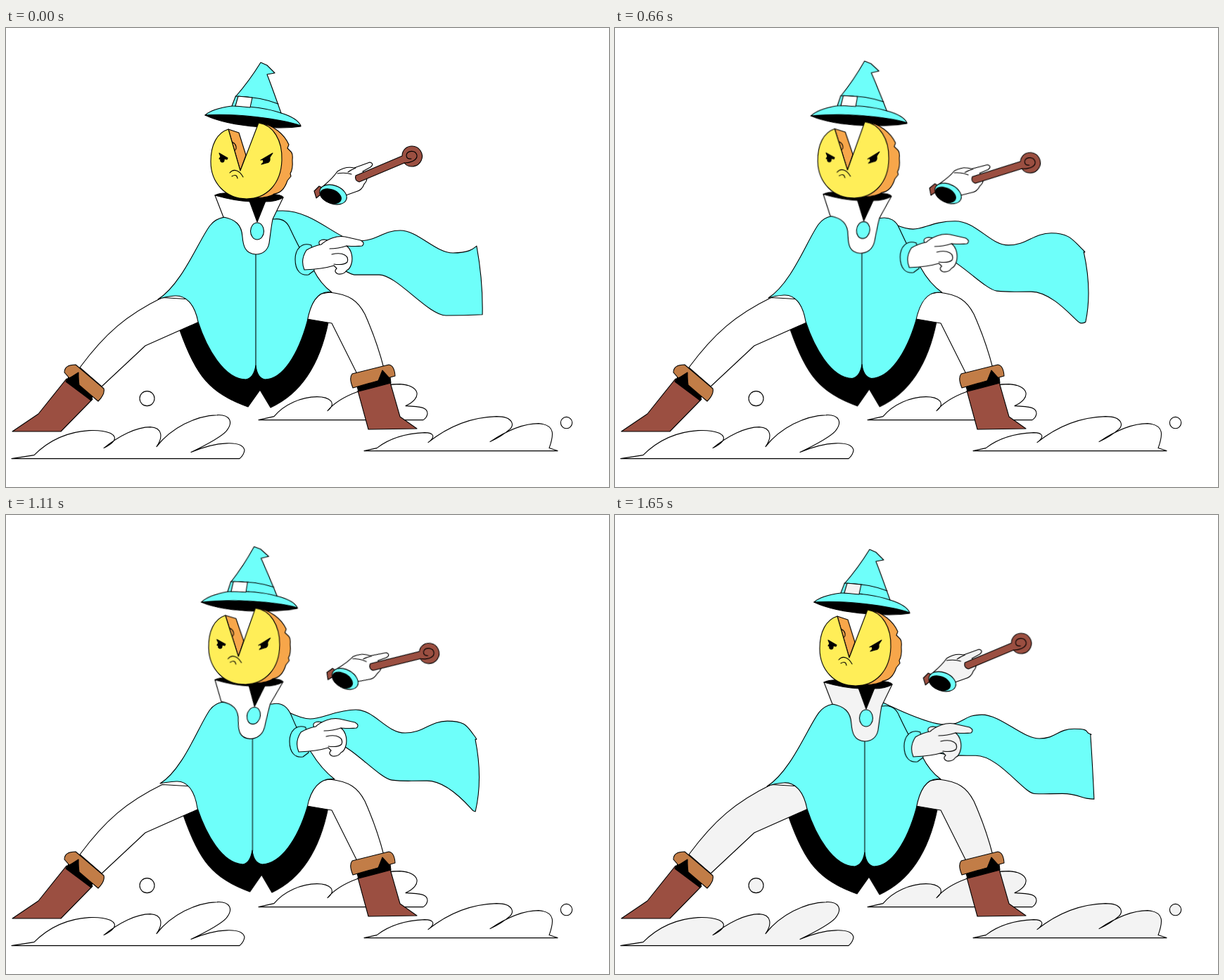
An HTML page without scripts that plays this animation: 857x653 px, repeating every 1680 ms.

```html
<!DOCTYPE html>
<html lang="en">
<head>
<meta charset="utf-8">
<title>Cheese wizard</title>
<style>
html, body { margin: 0; width: 100%; height: 100%; overflow: hidden; background: #fff; }
svg { display: block; width: 100vw; height: 100vh; }
path, ellipse, circle { stroke: #000; stroke-width: 1.1; stroke-linejoin: round; stroke-linecap: round; }
.line { fill: none; }
.ink { fill: #000; }
.cyan { fill: #6efffa; }
.yellow { fill: #ffee58; }
.orange { fill: #f7a64a; }
.brown { fill: #9b4f41; }
.tan { fill: #c27d47; }
.white { fill: #fff; animation: shade 840ms infinite step-end; }

@keyframes shade {
  0% { fill: #fff; }
  89.2% { fill: #f3f3f3; }
}

/* Each swaying part sets its two poses, --a and --b. */
.sway { animation: sway 840ms infinite; }
@keyframes sway {
  0% { transform: none; animation-timing-function: cubic-bezier(.4, 0, .7, .75); }
  32.14% { transform: var(--a); animation-timing-function: cubic-bezier(.3, .4, .6, 1); }
  57.14% { transform: var(--b); animation-timing-function: cubic-bezier(.4, 0, .6, 1); }
  100% { transform: none; }
}
.hat { transform-origin: 351px 132px; --a: translate(-5px, -3.5px) rotate(-3deg); --b: translate(-8.5px, -3.2px) rotate(-4.4deg); }
.head { transform-origin: 342px 190px; --a: translate(-3px, -2px) rotate(-1.6deg); --b: translate(-5.7px, -2.3px) rotate(-2.4deg); }
.collar { transform-origin: 345px 238px; --a: translate(0, -3.5px) skewX(-5.6deg); --b: translate(-2px, -3px) skewX(-7.5deg); }
.seam { --a: translate(-4.6px, -3px); --b: translate(-8.4px, -3px); }
.pants { transform-origin: 353px 480px; --a: translate(2.5px, -3px) scaleX(.976); --b: translate(1px, -2.5px) scaleX(.971); }
.point { --a: translate(-8px, -7px); --b: translate(-11.5px, -6.5px); }
.wand { transform-origin: 464px 237px; --a: translate(17px, -4px) rotate(9deg); --b: translate(17px, -3.5px) rotate(11deg); }

.poncho { animation: poncho 840ms infinite; }
@keyframes poncho {
  0%, 100% {
    d: path("M216,386 C250,365 275,300 290,281 C300,268 318,266 328,272 L380,272 C392,270 400,276 404,286 C412,303 425,330 437,344 Q447,364 463,376 C444,373 433,390 428,418 C415,465 393,500 368,500 Q357,498 355,480 Q352,498 341,500 C310,500 285,455 273,418 C268,392 255,380 240,381 Q226,382 216,386Z");
    animation-timing-function: cubic-bezier(.4, 0, .7, .75);
  }
  32.14% {
    d: path("M219,382 C252,362 275,297 290,277 C300,264 315,264 325,269 L378,269 C391,266 400,273 405,284 C411,298 421,323 434,338 Q448,361 467,376 C446,373 433,390 428,416 C414,463 390,496 364,497 Q352,495 350,477 Q347,495 337,497 C307,496 284,453 272,417 C268,390 256,378 242,379 Q228,380 219,382Z");
    animation-timing-function: cubic-bezier(.3, .4, .6, 1);
  }
  57.14% {
    d: path("M220,382 C252,362 274,297 289,277 C299,264 313,264 322,269 L374,269 C389,266 400,273 404,284 C411,298 420,323 432,338 Q446,362 467,377 C446,373 433,390 427,416 C412,463 387,496 361,497 Q349,495 347,477 Q344,495 333,497 C304,496 281,453 269,417 C265,390 254,378 240,379 Q228,380 220,382Z");
    animation-timing-function: cubic-bezier(.4, 0, .6, 1);
  }
}

/* Waves run outward along the cape, one wavelength per cycle. */
.cape { animation: wave 420ms linear infinite; }
@keyframes wave {
  0% { d: path("M370,275 S360,262 372,262 S348,260 393,260 S472,303 500,303 S535,288 560,288 S610,320 635,320 S665,313 669,310 Q678,360 677,408 S650,409 625,409 S555,351 530,351 S505,351 495,351 S450,322 430,322 S424,320 420,320 L410,330Z"); }
  14.286% { d: path("M370,275 S360,263 372,262 S342,261 397,261 S488,302 510,302 S548,284 577,284 S628,316 650,316 S658,316 662,314 Q680,365 680,395 S668,411 643,411 S580,357 550,357 S520,356 508,356 S455,322 432,322 S424,320 420,320 L410,330Z"); }
  64.286% { d: path("M385,272 S415,290 432,290 S470,277 497,277 S540,310 567,310 S602,293 627,293 S655,300 664,312 S666,317 667,320 Q678,375 667,422 S666,422 664,421 S630,378 598,378 S565,379 548,377 S490,328 470,325 S450,322 440,322 L410,330Z"); }
  92.857% { d: path("M372,263 S440,298 467,298 S493,284 520,284 S578,318 602,318 S628,304 652,304 S668,309 674,311 S676,312 676,312 Q679,360 681,404 S677,404 670,403 S655,396 635,396 S610,397 595,396 S545,342 512,342 S493,341 485,343 L410,330Z"); }
  100% { d: path("M390,258 S450,285 500,303 S535,288 560,288 S610,320 635,320 S660,312 667,311 S668,310 669,310 S669,310 669,310 Q678,360 677,408 S677,408 676,408 S665,407 660,407 S650,409 625,409 S555,351 530,351 S505,351 495,351 L410,330Z"); }
}
</style>
</head>
<body>
<svg viewBox="0 0 857 653" preserveAspectRatio="none">
  <g class="dust" transform="translate(0 .6)">
    <path class="white" d="M8,612 L40,607 C60,587 85,574 118,572 C145,571 159,578 153,587 Q149,592 139,597 C160,580 185,567 205,567 C223,568 223,582 214,595 C235,568 270,551 300,550 C318,549 324,560 313,573 Q304,583 263,603 C300,587 336,586 339,600 Q338,607 332,612Z"/>
    <path class="white" d="M359,557 L381,552 C395,535 420,524 442,524 C460,524 471,533 457,544 C475,522 520,506 560,506 C589,508 592,526 568,537 C590,538 599,539 599,548 Q598,554 593,557Z"/>
    <path class="white" d="M509,601 L527,597 C545,583 570,576 595,575 C608,575 611,581 600,589 C630,565 662,553 697,552 C722,552 723,566 715,571 Q705,580 688,588 C715,570 738,562 757,562 C782,564 778,580 772,597 L784,601Z"/>
    <circle class="white" cx="200.5" cy="526.5" r="10.5"/>
    <circle class="white" cx="796.5" cy="561" r="8.2"/>
  </g>

  <path class="cape cyan"/>
  <path class="pants sway ink" d="M247,430 C270,495 290,520 344,539 L361,515 L376,540 C420,520 446,478 458,419 L400,380 L290,380Z"/>

  <!-- legs and boots -->
  <path class="white" d="M265,386 L222,383.5 C172,408 141,434 105,483 L136,510 L198,452 L290,411Z"/>
  <path class="white" d="M425,382 L460,376 C488,379 500,388 510,407 Q527,445 537,484 L500,494 L463,420 L422,413Z"/>
  <path class="brown" d="M86,499 L46,549 L9,574 H78 L123,528Z"/>
  <path class="ink" d="M85,503 L92,492 L124,520 L121,530Z"/>
  <path class="tan" d="M83,490 Q83,479 99,479 L139,513 Q141,521 131,531 L104,508 L102,492 L90,498Z"/>
  <path class="ink" d="M86,501 L103,490 V507Z"/>
  <path class="brown" d="M500,516 L546,504 L560,553 L584,570 L515,571Z"/>
  <path class="ink" d="M499,510 L546,497 L547,505 L501,517Z"/>
  <path class="tan" d="M493,512 Q487,498 492,492 L544,479 Q552,480 553,495Z"/>
  <path class="ink" d="M529,502 L535,487 L545,498Z"/>

  <path class="poncho cyan"/>
  <path class="seam sway line" d="M355,320 V481"/>

  <g class="collar sway">
    <path class="ink" d="M297,238 Q305,234 320,235 L375,236 Q392,237 394,241 L380,252 L320,252Z"/>
    <path class="white" d="M297,238 Q325,246 347,247 H368 Q385,247 394,241 L379,272 C377,282 376,292 374,306 C372,317 364,322 355,322 C340,321 337,310 336,297 C335,280 326,272 309,269Z"/>
    <path class="ink" d="M346,246 H369 L357,276Z"/>
    <ellipse class="cyan" cx="357" cy="289" rx="9.5" ry="12"/>
  </g>

  <g class="hat sway">
    <path class="ink" d="M283,124 C300,120 400,128 419,140 C400,143 325,144 283,124Z"/>
    <path class="cyan" d="M283,124 Q292,115 321,111 L326,98 Q346,75 362,49 L371,53 Q377,59 382,64 L371,66 Q378,84 391,121 Q414,128 419,139 C390,129 325,121 283,124Z"/>
    <path class="line" d="M326,97 Q362,98 387,108 M321,111 Q362,111 391,121"/>
    <path class="white" d="M330,97 L350,99 L347,113 L326,111Z"/>
  </g>

  <g class="head sway">
    <path class="orange" d="M359,135 C380,137 396,152 402,166 L400,171 L405,176 Q408,179 407,188 Q408,201 404,207 L405,211 L400,217 Q394,235 381,236 Q375,241 355,242Z"/>
    <path class="orange" d="M316,144 L331,149 L341,181 L333,203Z"/>
    <path class="line" d="M321,162 Q328,165 327,172 Q323,178 320,170"/>
    <path class="yellow" d="M333,203 L359,135 C380,138 393,160 392,188 C391,222 370,243 342,243 C312,243 291,220 291,190 C291,166 300,149 316,144Z"/>
    <path class="ink" d="M303,178 L315,185 L314,187 L310,186 Q311,191 307,191 Q304,190 305,187 L303,186 L305,183Z"/>
    <path class="ink" d="M379,178 L375,184 Q376,192 370,192 L363,194 L366,191 L365,187 L362,188Z"/>
    <path class="line" d="M318,206 C324,199 332,203 337,212 M321,211 Q328,207 329,214"/>
  </g>

  <g class="point sway">
    <path class="cyan" d="M434,309 C420,304 411,315 411,329 C411,345 419,353 430,351 L438,345Z"/>
    <path class="white" d="M446,309 Q442,302 452,301 L466,303Z"/>
    <path class="white" d="M427,316 Q437,310 448,308 C457,300 470,295 482,297 L504,302 Q511,306 506,310 Q498,311 484,310 C492,316 493,328 491,335 Q489,343 484,345 Q480,351 472,350 Q465,347 470,342 L466,338 Q450,343 424,344 Q418,330 427,316Z"/>
    <path class="line" d="M484,310 Q472,314 460,314 M463,322 C480,318 488,325 485,333 Q480,338 466,336"/>
  </g>

  <g class="wand sway">
    <path class="brown" d="M438,232 L445,225 L455,230 L441,242Z"/>
    <path class="white" d="M452,224 Q465,213 471,204 Q483,196 495,199 L517,191 Q524,193 518,198 L507,204 L513,213 Q513,218 509,222 Q506,231 497,233 L483,238Z"/>
    <path class="brown" d="M497,210 L563,182 C563,173 570,168 577,168 A14.5,14.5 0 1 1 566,192 L502,219 Q495,217 497,210Z"/>
    <path class="line" d="M566,192 C573,192 585,189 584,181 C582,173 570,174 569,181 Q569,187 576,186"/>
    <path class="line" d="M471,207 Q482,205 491,208 M497,199 Q490,202 486,205"/>
    <ellipse class="cyan" cx="465" cy="237" rx="20" ry="13" transform="rotate(21 465 237)"/>
    <ellipse class="ink" cx="461.5" cy="239" rx="15.5" ry="9.5" transform="rotate(21 461 239)"/>
  </g>
</svg>
</body>
</html>
```
